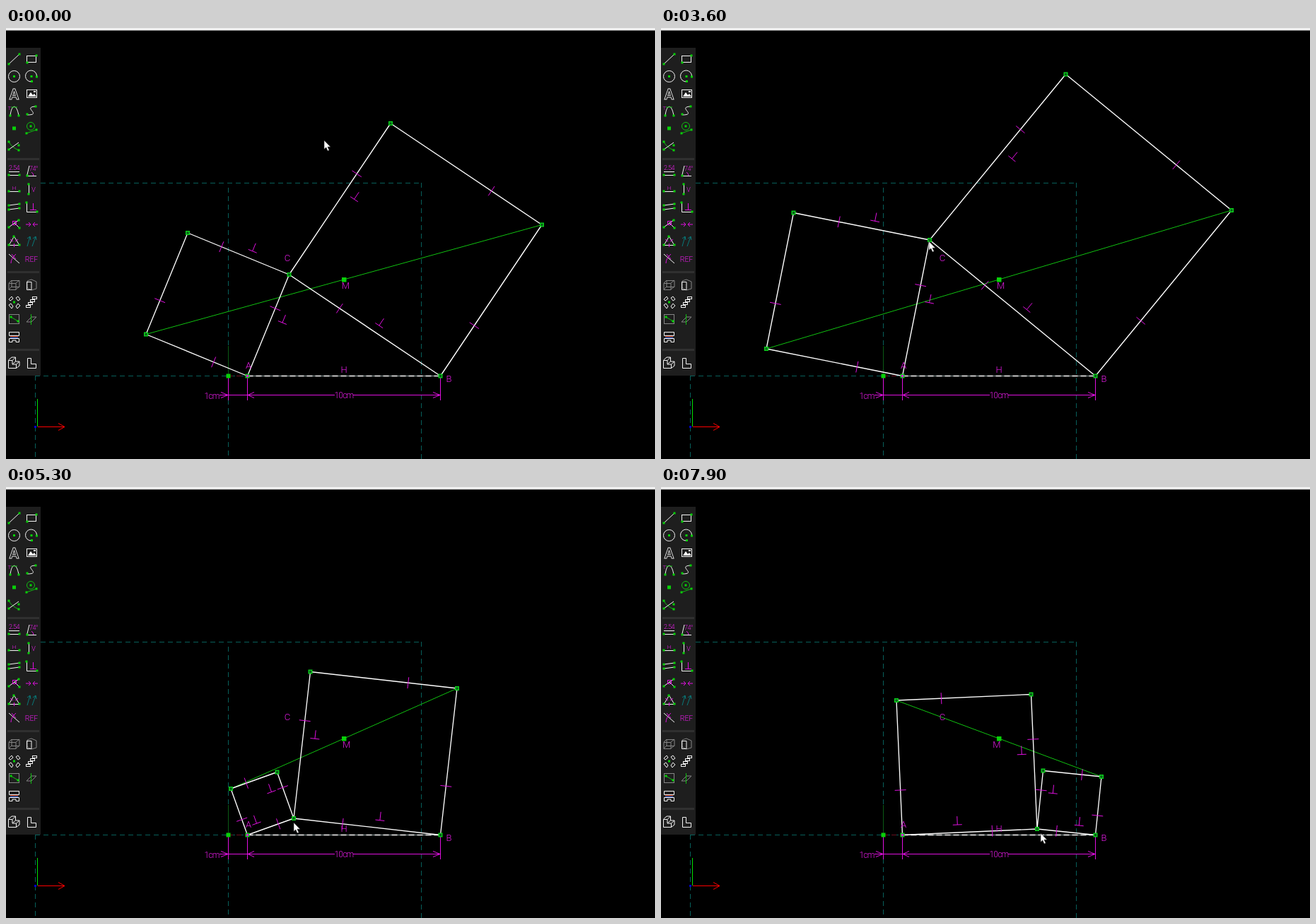
An HTML page that plays this animation: 918 px wide and 610 px high, repeating every 8000 ms.

```html
<!DOCTYPE html>
<html lang="en">
<head>
<meta charset="utf-8">
<title>Two squares sketch</title>
<style>
  html, body { margin: 0; width: 100%; height: 100%; overflow: hidden; background: #000; }
  svg { display: block; width: 918px; height: 610px; }
  path, rect, circle, polygon { fill: none; stroke-width: 1; }
  text { font-family: Roboto, "Open Sans", sans-serif; font-weight: 300; fill: #e81ce8; text-anchor: middle; }
  .w { stroke: #f4f4f4; }
  .g { stroke: #10c010; }
  .m { stroke: #e010e0; }
  .t { stroke: #087878; }
  .dim { stroke: #858585; }
  .dot { fill: #08d008; stroke: none; }
  .dash { stroke: #075f5a; stroke-dasharray: 7 5; }
  .edge { stroke: #fff; stroke-width: 1.35; }
  .vertex { fill: #0a5a1a; stroke: #0cd01c; stroke-width: 1.4; }
</style>
</head>
<body>
<svg id="stage" viewBox="0 0 918 610" xmlns="http://www.w3.org/2000/svg"></svg>
<script>
const stage = document.getElementById('stage');

function add(tag, attrs, content) {
  const el = document.createElementNS('http://www.w3.org/2000/svg', tag);
  for (const k in attrs) el.setAttribute(k, attrs[k]);
  if (content) el.textContent = content;
  stage.append(el);
  return el;
}
const path = (cls, d) => add('path', { class: cls, d });
const box = (cls, x, y, width, height) => add('rect', { class: cls, x, y, width, height });
const fill = (color, x, y, width, height) => add('rect', { x, y, width, height, style: `fill:${color}` });
const circle = (cls, cx, cy, r) => add('circle', { class: cls, cx, cy, r });
const label = (s, x, y, size = 13, gap = 0) =>
  add('text', { x, y, 'font-size': size, 'letter-spacing': gap }, s);
function dots(...xy) {
  for (let i = 0; i < xy.length; i += 2) box('dot', xy[i] - 1.5, xy[i + 1] - 1.5, 3, 3);
}

function drawPlane() {
  path('dash', 'M49 219.5H588');
  path('dash', 'M587.5 219V610');
  path('dash', 'M314.5 226V610');
  path('dash', 'M41 492.5H588');
  path('dash', 'M41.5 492V610');
  add('path', { d: 'M314.5 450V492', stroke: '#0a5a14' });
  add('path', { d: 'M314 492.5H341', stroke: '#6a1020', 'stroke-dasharray': '7 5' });
  add('path', { d: 'M44.5 525V564', stroke: '#00e000', 'stroke-width': 1.4 });
  add('path', { d: 'M45 564.5H83M74 559.5L83 564.5L74 569.5', stroke: '#f00', 'stroke-width': 1.4 });
  fill('#0000d0', 40, 563, 3, 3);
}

function drawDimensions() {
  path('m', 'M314.5 492V527M341.5 492V527M614.5 492V527');
  path('m', 'M302 519.5H465M491 519.5H614');
  path('m', 'M304 515.5L314 519.5L304 523.5M351 515.5L342 519.5L351 523.5M604 515.5L614 519.5L604 523.5');
  label('1cm', 291, 524.5, 12, -.8);
  label('10cm', 478, 524, 12, -.8);
  label('H', 478, 488);
  label('A', 343, 482);
  label('B', 626.5, 500.5);
  label('C', 398, 330);
}

function drawToolbar() {
  fill('#1e1e1e', 0, 28, 49, 464);
  for (const y of [184, 344, 454]) fill('#303030', 2, y, 45, 3);

  // Sketch tools
  path('w', 'M4 51L19 37'); dots(4, 51, 19, 37);
  box('w', 29.5, 39.5, 13, 9); dots(30, 49, 43, 39);
  circle('w', 11.5, 68.5, 8); dots(11.5, 68.5);
  path('w', 'M36 76A8 8 0 1 1 43.5 68'); dots(36, 68.5, 43.5, 69, 36.5, 75.5);
  add('text', { x: 11.5, y: 100.5, 'font-size': 20, style: 'fill:none;stroke:#eee;stroke-width:.8;font-weight:700' }, 'A');
  box('w', 29.5, 87.5, 14, 11);
  add('path', { d: 'M31 97L35 91L38 95L40 93L43 97Z', style: 'fill:#fff' });
  fill('#fff', 39, 89, 3, 2);
  label('T', 5, 116, 8);
  path('w', 'M6 124C8 107 15 107 18 124'); path('g', 'M7 112H16'); dots(6, 124, 18, 124);
  path('w', 'M30 123C52 123 22 112 42 111'); dots(30, 122, 42, 111);
  box('dot', 9, 139.5, 5, 5);
  circle('g', 35, 139, 5.5); path('g', 'M29 149L43 144'); dots(35, 139, 29, 149, 43, 144);
  path('g', 'M4 161Q8 169 18 173'); path('w', 'M4 172L18 162');
  dots(4, 161, 18, 173, 4, 172, 18, 166);

  // Constraints
  label('2.54', 11.5, 201, 9, -.5); path('w', 'M4 203.5H19M4 208.5H19'); dots(4, 208, 19, 208);
  label('74°', 39, 202, 9, -.5); path('w', 'M33 195L29.5 209.5H43'); path('m', 'M36 204Q39 206 39 209'); dots(30, 209);
  label('H', 11.5, 229, 8); path('w', 'M4 231.5H19'); dots(4, 231, 19, 231);
  path('w', 'M32.5 221V235'); label('V', 39, 232, 9); dots(32, 221, 32, 235);
  path('w', 'M4 251L19 249M4 257L19 255'); dots(4, 251, 19, 249, 4, 257, 19, 255);
  path('w', 'M29.5 247V260.5H44'); path('m', 'M38.5 248V257M34 257.5H43'); dots(29, 247, 44, 260);
  path('w', 'M4 282L12 276L19 283M12 276L18 272'); box('m', 9.5, 273.5, 5, 5); dots(4, 282, 18, 272, 19, 283);
  path('m', 'M28 278H35M32 275L35 278L32 281M45 278H38M41 275L38 278L41 281');
  path('w', 'M11.5 295L4 307.5H19Z'); path('m', 'M6 299L10 302M17 299L13 302M11.5 305V310'); dots(11, 295, 4, 307, 19, 307);
  path('t', 'M30 309L34 295M30 298L34 295L35 300M37 309L42 295M38 298L42 295L43 300');
  path('w', 'M4 320L19 333'); path('m', 'M7 333Q7 326 14 320M8 320L14 327');
  label('REF', 36, 331, 10.5);

  // Solids and patterns
  path('dim', 'M4 361.5H14V370.5H4ZM8 357.5H19V366.5H8ZM4 361L8 357M14 361L19 357M14 370L19 366M4 370L8 366');
  path('dim', 'M30 358L36 356L43 359V369L36 371L30 368Z'); path('w', 'M29.5 359.5H36V370.5H29.5Z');
  path('w', 'M4 384L8 380L10 383L6 386ZM14 382L17 380L20 384L17 386ZM4 392L7 390L10 394L8 397ZM14 394L17 390L20 393L16 397Z');
  dots(11.5, 388);
  for (let i = 0; i < 4; i++) box('w', 28.5 + i * 3, 392.5 - i * 4, 6, 3);
  box('dim', 4.5, 405.5, 14, 13); path('g', 'M7 409L17 415'); dots(7, 409, 17, 415);
  path('dim', 'M29 416L36 409H43L36 416Z'); path('g', 'M35.5 405V420');
  path('w', 'M4.5 430.5H18.5V435.5H4.5ZM4.5 444.5V439.5H18.5V444.5H14V442H9V444.5Z');
  add('path', { d: 'M6 436.5H17', stroke: '#d04028' });
  add('path', { d: 'M6 438.5H17', stroke: '#4068e0' });
  path('w', 'M3.5 470.5H9V476H14.5V481.5H3.5ZM3.5 470L8 466H13.5L9 470.5M13.5 466V472L9 476M13.5 472H19L14.5 476M19 472V478L14.5 481.5');
  path('w', 'M30.5 467.5H35.5V475.5H42.5V481.5H30.5Z');
}

// Fixed artwork and moving parts, in paint order
fill('#f0f0f0', 0, 0, 918, 3.5);
drawPlane();
const span = path('g', '');
add('path', { d: 'M341.5 492.5H614.5', stroke: '#8c9c9c' });
add('path', { d: 'M341.5 492.5H614.5', class: 'edge', 'stroke-dasharray': '8 4' });
const edges = path('edge', '');
drawDimensions();
const marks = path('m', '');
const mid = label('M', 0, 0);
const corners = Array.from({ length: 7 }, () => box('vertex', 0, 0, 4.6, 4.6));
corners[0].style.fill = '#e010e0';
box('dot', 475, 353, 6.5, 6.5);
box('dot', 311.5, 489.5, 6, 6);
drawToolbar();
const cursor = add('path', {
  d: 'M0 0V12.5L2.8 10L5 15L7.2 14L5 9.3H9Z',
  style: 'fill:#fff;stroke:#222;stroke-width:.6'
});

// Rows are [ms, x, y]
const apexKeys = [
  [2500, 400.5, 349], [2600, 400, 344], [3400, 380.5, 300], [3500, 380.5, 300],
  [3600, 380, 300], [4200, 381, 386], [4400, 383, 401.5], [5300, 407, 469],
  [5800, 409, 484], [6300, 409, 484], [6800, 444, 484], [7900, 532, 484]
];
const cursorKeys = [
  [500, 450, 159], [1400, 404, 352], [1700, 400, 350], [2500, 400, 350], [2600, 400, 345],
  [3400, 379.5, 302], [3500, 379.5, 302], [3600, 379, 302], [4200, 381, 391], [4400, 383, 407],
  [5300, 407, 475], [5800, 412, 490], [6300, 412, 490], [6800, 450, 490], [7900, 537, 490]
];

function at(keys, t) {
  const i = keys.findIndex(k => k[0] > t);
  if (i === 0) return keys[0].slice(1);
  if (i < 0) return keys[keys.length - 1].slice(1);
  const [t0, x0, y0] = keys[i - 1], [t1, x1, y1] = keys[i];
  const f = (t - t0) / (t1 - t0);
  return [x0 + (x1 - x0) * f, y0 + (y1 - y0) * f];
}

const A = [341.5, 492.5], B = [614.5, 492.5];
const mix = (p, q, f) => [p[0] + (q[0] - p[0]) * f, p[1] + (q[1] - p[1]) * f];
const unit = (p, q) => {
  const x = q[0] - p[0], y = q[1] - p[1], n = Math.hypot(x, y) || 1;
  return [x / n, y / n];
};
const line = (p, q) => `M${p.map(v => v.toFixed(2))}L${q.map(v => v.toFixed(2))}`;

// Equal-length tick, two thirds along an edge
function tick(p, q) {
  const [x, y] = unit(p, q), [cx, cy] = mix(p, q, 2 / 3);
  return line([cx - y * 8, cy + x * 8], [cx + y * 8, cy - x * 8]);
}

// Upright perpendicular sign beside the middle of an edge
function perp(p, q) {
  let [x, y] = unit(p, q);
  if (Math.abs(x) < Math.abs(y)) [x, y] = [-y, x];
  if (x < 0) [x, y] = [-x, -y];
  const c = mix(p, q, .5), side = y >= 0 ? 17 : -17;
  const spot = (u, v) => [c[0] + x * u + y * v, c[1] + y * u - x * v];
  return line(spot(side - 6.5, 11), spot(side + 6.5, 11)) + line(spot(side, 11), spot(side, 23));
}

function draw(t) {
  const C = at(apexKeys, t);
  const h = A[1] - C[1], a = C[0] - A[0], b = B[0] - C[0];
  const P = [C[0] - h, C[1] - a], Q = [A[0] - h, A[1] - a];
  const R = [C[0] + h, C[1] - b], S = [B[0] + h, B[1] - b];
  const sides = [[A, C], [C, P], [P, Q], [Q, A], [B, C], [C, R], [R, S], [S, B]];

  edges.setAttribute('d', sides.map(s => line(...s)).join(''));
  marks.setAttribute('d', sides.map(s => tick(...s)).join('') +
    [0, 1, 4, 5].map(i => perp(...sides[i])).join(''));
  span.setAttribute('d', line(Q, S));
  [A, B, C, P, Q, R, S].forEach(([x, y], i) => {
    corners[i].setAttribute('x', x - 2.3);
    corners[i].setAttribute('y', y - 2.3);
  });

  const [ux, uy] = unit(Q, S);
  mid.setAttribute('x', 478 - uy * 9);
  mid.setAttribute('y', 360.8 + ux * 9);
  cursor.setAttribute('transform', `translate(${at(cursorKeys, t)})`);
}

const start = performance.now();
function frame(now) {
  const t = Math.max(0, now - start) % 8000;
  draw(Math.floor(t / 100) * 100);
  requestAnimationFrame(frame);
}
draw(0);
requestAnimationFrame(frame);
</script>
</body>
</html>
```
